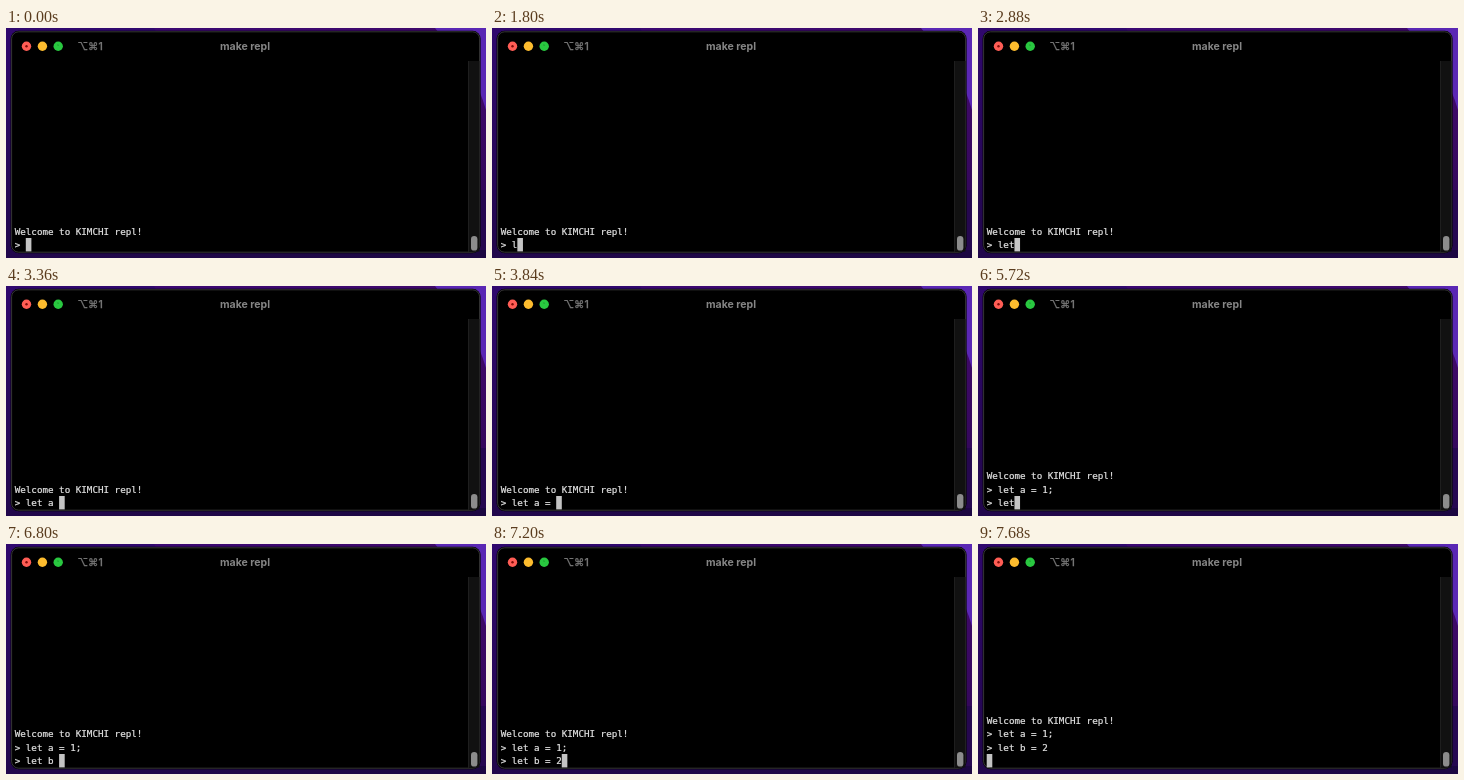
An HTML page that plays this animation: 480x230 px, repeating every 8 s.

```html
<!DOCTYPE html>
<html lang="en">
<head>
<meta charset="utf-8">
<title>Terminal session</title>
<style>
html, body { margin: 0; width: 100%; height: 100%; overflow: hidden; background: #1b083f; }
svg { display: block; width: 480px; height: 230px; }
.mono { font: 9.22px "DejaVu Sans Mono", "Liberation Mono", monospace; fill: #e2e2e2; stroke: #e2e2e2; stroke-width: .22px; white-space: pre; }
.title { font: 700 10.5px Inter, "Open Sans", sans-serif; fill: #858585; }
.keys { font: 500 10.4px Inter, "DejaVu Sans", sans-serif; fill: #777; stroke: #777; stroke-width: .25px; }
</style>
</head>
<body>
<svg viewBox="0 0 480 230">
  <defs>
    <linearGradient id="left" x2="0" y2="1">
      <stop offset="0" stop-color="#30086e"/>
      <stop offset="1" stop-color="#22074c"/>
    </linearGradient>
    <linearGradient id="top">
      <stop offset="0" stop-color="#3b0872"/>
      <stop offset="1" stop-color="#40096a"/>
    </linearGradient>
    <linearGradient id="right" x2="0" y2="1">
      <stop offset="0" stop-color="#430a6e"/>
      <stop offset="1" stop-color="#35085c"/>
    </linearGradient>
    <linearGradient id="bottom">
      <stop offset="0" stop-color="#22074c"/>
      <stop offset="1" stop-color="#1c0742"/>
    </linearGradient>
  </defs>
  <rect width="480" height="230" fill="url(#left)"/>
  <path d="M148 0H480V20H160Z" fill="url(#top)"/>
  <rect x="440" y="20" width="40" height="142" fill="url(#right)"/>
  <path d="M440 162H480V230H440Z" fill="#260850"/>
  <rect y="222" width="480" height="8" fill="url(#bottom)"/>
  <path d="M429 0H480V82Q474 62 466 48Z" fill="#5a27b4"/>

  <rect x="4.6" y="2.8" width="470" height="222.4" rx="8" fill="#000"/>
  <rect x="5.6" y="3.8" width="468" height="220.4" rx="7" fill="none" stroke="#444" stroke-width=".8"/>
  <rect x="462" y="33" width="11.4" height="190.5" fill="#111"/>
  <path d="M462.5 33V224" stroke="#222" stroke-width=".8"/>
  <rect x="465" y="208" width="6.4" height="14.6" rx="3.2" fill="#8c8c8c"/>

  <circle cx="20.5" cy="18.2" r="4.7" fill="#ff5d55"/>
  <circle cx="20.5" cy="18.2" r="1.2" fill="#7d0c08"/>
  <circle cx="36.4" cy="18.2" r="4.7" fill="#fdbc2e"/>
  <circle cx="52.2" cy="18.2" r="4.7" fill="#29c840"/>
  <path d="M51 16.9l2 .4" stroke="#1b9a2e" stroke-width=".8"/>
  <text class="keys" x="71.5" y="21.8">⌥⌘1</text>
  <text class="title" x="239" y="21.6" text-anchor="middle">make repl</text>

  <rect id="cursor" y="210" width="5.6" height="13.4" fill="#c4c4c4"/>
  <g id="rows"></g>
</svg>
<script>
const LOOP = 8000, LEFT = 8.7, COL = 5.55, LINE = 13.4, BASE = 220.1;
const PROMPT = "> ";
const GREETING = "Welcome to KIMCHI repl!";

// Each key press: time in ms and the text it sends.
const keys = [
  [1800, "l"], [1960, "e"], [2160, "t"], [2920, " "], [3000, "a"],
  [3360, " "], [3520, "="], [3800, " "], [4160, "1"], [4320, ";"],
  [4560, "\n" + PROMPT],
  [5280, "l"], [5400, "e"], [5480, "t"], [6280, " "], [6520, "b"],
  [6800, " "], [6880, "="], [6960, " "], [7200, "2"],
  [7560, "\n"]
];

const cursor = document.getElementById("cursor");
const group = document.getElementById("rows");
const rows = Array.from({ length: 4 }, (_, i) => {
  const row = document.createElementNS("http://www.w3.org/2000/svg", "text");
  row.setAttribute("class", "mono");
  row.setAttribute("x", LEFT);
  row.setAttribute("y", BASE - i * LINE);
  return group.appendChild(row);
});

function screenAt(time) {
  const typed = keys.filter(([at]) => at <= time).map(([, text]) => text).join("");
  return GREETING + "\n" + PROMPT + typed;
}

let shown = null;
function render(time) {
  const screen = screenAt(time);
  if (screen === shown) return;
  shown = screen;
  const lines = screen.split("\n").reverse();
  rows.forEach((row, i) => { row.textContent = lines[i] || ""; });
  cursor.setAttribute("x", LEFT + lines[0].length * COL);
}

const start = performance.now();
function tick() {
  render((performance.now() - start) % LOOP);
  requestAnimationFrame(tick);
}
tick();
</script>
</body>
</html>
```
